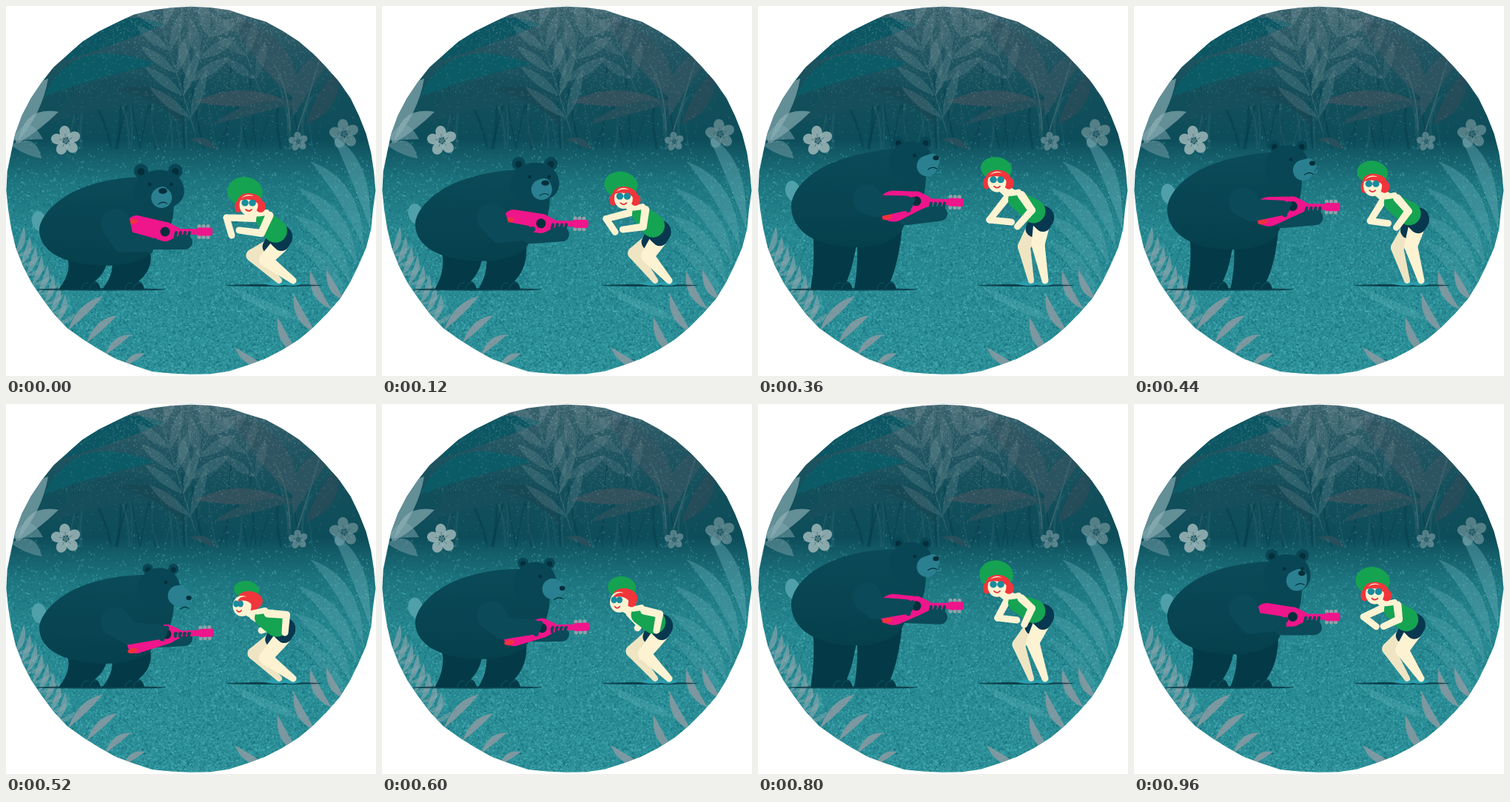
Write an HTML page with a canvas that moves like this. It is 500 px wide and 500 px high and loops after 1000 ms.

```html
<!DOCTYPE html>
<html lang="en">
<head>
<meta charset="utf-8">
<title>Jungle jam</title>
<style>
html, body { margin: 0; width: 100%; height: 100%; overflow: hidden; background: #fff; }
canvas { display: block; width: 100vmin; height: 100vmin; }
</style>
</head>
<body>
<canvas id="stage" width="500" height="500"></canvas>
<script>
const stage = document.getElementById('stage');
const backdrop = document.createElement('canvas');
backdrop.width = backdrop.height = 500;
let g = backdrop.getContext('2d');
const TAU = Math.PI * 2;

let seed = 7;
function rnd() {
  seed = (seed * 16807) % 2147483647;
  return seed / 2147483647;
}

// ---- drawing helpers ----
function oval([x, y], rx, ry, color, rot = 0) {
  g.fillStyle = color;
  g.beginPath();
  g.ellipse(x, y, rx, ry, rot, 0, TAU);
  g.fill();
}

// Rounded limb that tapers from r1 to r2
function limb(p, r1, q, r2, color) {
  const dx = q[0] - p[0], dy = q[1] - p[1], d = Math.hypot(dx, dy);
  if (d <= Math.abs(r1 - r2)) {
    const r = Math.max(r1, r2);
    return oval(r1 > r2 ? p : q, r, r, color);
  }
  const a = Math.atan2(dy, dx), b = Math.acos((r1 - r2) / d);
  g.fillStyle = color;
  g.beginPath();
  g.arc(...p, r1, a + b, a - b + TAU);
  g.arc(...q, r2, a - b, a + b);
  g.fill();
}

function joint(a, ra, b, rb, c, rc, color) {
  limb(a, ra, b, rb, color);
  limb(b, rb, c, rc, color);
}

function line(x1, y1, cx, cy, x2, y2, w, color) {
  g.strokeStyle = color;
  g.lineWidth = w;
  g.lineCap = 'round';
  g.beginPath();
  g.moveTo(x1, y1);
  g.quadraticCurveTo(cx, cy, x2, y2);
  g.stroke();
}

// Curved leaf from base to tip, w wide
function blade(x1, y1, cx, cy, x2, y2, w, color) {
  const d = Math.hypot(x2 - x1, y2 - y1), nx = (y1 - y2) / d * w, ny = (x2 - x1) / d * w;
  g.fillStyle = color;
  g.beginPath();
  g.moveTo(x1, y1);
  g.quadraticCurveTo(cx + nx, cy + ny, x2, y2);
  g.quadraticCurveTo(cx - nx, cy - ny, x1, y1);
  g.fill();
}

function frond(x1, y1, x2, y2, count, len, w, color) {
  const a = Math.atan2(y2 - y1, x2 - x1);
  line(x1, y1, (x1 + x2) / 2, (y1 + y2) / 2, x2, y2, 1.5, color);
  for (let i = 0; i < count; i++) {
    const u = (i + .6) / count, x = x1 + (x2 - x1) * u, y = y1 + (y2 - y1) * u;
    const l = len * (1 - u * .3);
    for (const b of [a - .62, a + .62]) {
      const ex = Math.cos(b) * l, ey = Math.sin(b) * l;
      blade(x, y, x + ex * .55, y + ey * .55, x + ex, y + ey, w, color);
    }
  }
}

function flower(x, y, r, color, core) {
  for (let i = 0; i < 5; i++) {
    const a = i * TAU / 5 - 1.7, dx = Math.cos(a) * r, dy = Math.sin(a) * r;
    oval([x + dx * .6, y + dy * .6], r * .42, r * .36, color, a);
    line(x, y, x, y, x + dx * .45, y + dy * .45, 1, core);
  }
  oval([x, y], r * .15, r * .15, core);
}

// ---- still scenery ----
function rim() {
  g.beginPath();
  for (let i = 0; i < 60; i++) {
    const a = i * TAU / 60, r = 250 - rnd() * 2.4;
    g.lineTo(249.5 + Math.cos(a) * r, 249.5 + Math.sin(a) * r);
  }
  g.closePath();
}

function jungle() {
  for (let i = 0; i < 34; i++) {
    const x = 90 + rnd() * 330, y = 70 + rnd() * 60;
    line(x + (rnd() - .5) * 24, 192, x, 150, x + (rnd() - .5) * 50, y, 1 + rnd() * 2.5,
      i % 2 ? 'rgba(60,112,122,.25)' : 'rgba(5,56,70,.4)');
  }
  // broad leaves, left then right
  blade(78, 74, 140, 22, 214, 25, 32, '#0c5663');
  blade(52, 122, 100, 68, 202, 78, 34, '#0b5b67');
  blade(60, 158, 130, 92, 250, 130, 38, '#164e5b');
  blade(150, 112, 222, 112, 240, 163, 19, '#174955');
  blade(395, 130, 368, 60, 302, 14, 38, '#2e5561');
  blade(254, 130, 320, 118, 392, 134, 22, '#31515d');
  blade(280, 160, 332, 134, 400, 128, 14, '#24505c');
  blade(388, 150, 398, 80, 452, 58, 27, '#2c5360');
  blade(405, 160, 438, 128, 448, 84, 23, '#254c59');
  blade(248, 180, 270, 180, 286, 195, 9, '#28505c');
  line(384, 168, 382, 110, 362, 78, 2, '#3b626b');
  line(394, 168, 410, 120, 426, 66, 2, '#36616b');

  frond(255, 170, 208, 18, 5, 72, 13, 'rgba(142,165,171,.2)');
  frond(240, 120, 292, 0, 4, 66, 15, 'rgba(145,160,168,.18)');
  frond(345, 118, 296, -8, 4, 56, 12, 'rgba(140,158,166,.14)');
}

function grain() {
  for (let i = 0; i < 24000; i++) {
    const y = 170 + Math.sqrt(rnd()) * 330, s = .8 + rnd() * 1.6;
    g.fillStyle = rnd() < .56 ? 'rgba(95,195,200,.3)' : 'rgba(10,95,110,.3)';
    g.fillRect(rnd() * 500, y, s, s);
  }
  // pale mist of specks at the top
  for (let i = 0; i < 4500; i++) {
    const x = 270 + (rnd() + rnd() - 1) * 230, y = rnd() * rnd() * 190;
    g.fillStyle = 'rgba(160,180,187,.18)';
    g.fillRect(x, y, 1.5, 1.5);
  }
}

function foreground() {
  const white = 'rgba(150,182,188,.62)', fern = 'rgba(138,155,163,.85)';
  blade(14, 186, 22, 132, 57, 98, 30, white);
  blade(16, 186, 36, 150, 71, 143, 20, white);
  blade(8, 182, 30, 160, 50, 180, 20, 'rgba(130,170,178,.5)');
  blade(6, 188, 34, 186, 48, 206, 18, 'rgba(120,160,168,.5)');
  flower(81, 182, 20, 'rgba(168,190,192,.8)', '#527a81');
  flower(395, 183, 13, 'rgba(140,168,174,.55)', '#356871');
  flower(457, 173, 20, 'rgba(140,168,174,.55)', '#386a74');

  // palm sweeping in from the right
  for (let i = 0; i < 5; i++) {
    const x = 440 - 34 * i + 5.5 * i * i, y = 174 + 36 * i, bx = 492 - 9 * i, by = 300 + 25 * i;
    blade(bx, by, x + (bx - x) * .75, y + (by - y) * .3, x, y, 19, `rgba(105,172,181,${.42 - .05 * i})`);
  }
  blade(405, 425, 352, 410, 300, 378, 12, 'rgba(120,195,198,.2)');

  // ferns along the lower rim
  for (let i = 0; i < 8; i++) {
    const x = 24 + 8 * i, y = 298 + 13 * i;
    blade(x - 13, y + 40, x + 1, y + 22, x, y, 8, 'rgba(135,165,172,.65)');
    blade(x - 13, y + 40, x + 6, y + 38, x + 14, y + 26, 6, 'rgba(135,165,172,.5)');
  }
  for (let i = 0; i < 4; i++) {
    const x = 131 + 19 * i, y = 392 + 26 * i, bx = 84 + 25 * i, by = 438 + 17 * i;
    blade(bx, by, (x + bx) / 2 - 3, (y + by) / 2 - 7, x, y, 11 - i, fern);
  }
  for (let i = 0; i < 3; i++) {
    const x = 411 - 22 * i, y = 358 + 31 * i;
    blade(x + 29, y + 52, x + 5, y + 33, x, y, 11, fern);
  }
  blade(456, 396, 440, 386, 433, 356, 10, fern);
  blade(352, 487, 326, 482, 309, 461, 10, fern);
}

function scenery() {
  g.fillStyle = '#fff';
  g.fillRect(0, 0, 500, 500);
  rim();
  g.clip();
  const sky = g.createLinearGradient(0, 0, 0, 500);
  [[0, '#37606b'], [.12, '#215561'], [.24, '#124f5b'], [.36, '#0d4d5a'], [.41, '#155f6b'],
    [.48, '#1d7680'], [.6, '#26868f'], [.8, '#298c95'], [1, '#2d9199']]
    .forEach(([at, c]) => sky.addColorStop(at, c));
  g.fillStyle = sky;
  g.fillRect(0, 0, 500, 500);
  jungle();
  grain();
  foreground();
  oval([128, 383], 88, 1.7, 'rgba(6,48,60,.75)');
  oval([362, 377.5], 65, 1.5, 'rgba(6,48,60,.8)');
}

// ---- motion: two dips per loop, each to its own side ----
let dip, side, sway;

function pose(step) {
  const beat = (1 + Math.cos((step - .75) * TAU / 12)) / 2;
  dip = Math.min(1, 1.17 * beat ** 4);
  side = dip * Math.cos(step * TAU / 24);
  sway = Math.sin(step * TAU / 24);
}

const mixed = (v, d, e = 0, s = 0) => v + d * dip + e * side + s * sway;
const at = (x, y, dx, dy, ex, ey, sx, sy) => [mixed(x, dx, ex, sx), mixed(y, dy, ey, sy)];
const add = ([x, y], dx, dy) => [x + dx, y + dy];
const mix = (a, b, u) => [a[0] + (b[0] - a[0]) * u, a[1] + (b[1] - a[1]) * u];

// ---- bear ----
const FUR = '#094655', ARM = '#0b4a58', LEG = '#043a47', INK = '#042f3b', PINK = '#ef158b';

function bearLegs(d) {
  const bend = d * .42, y = 345 + d * .32;
  g.fillStyle = LEG;
  for (const x of [72, 131]) {
    g.beginPath();
    g.moveTo(x + 2 + bend * .4, 300 + d);
    g.quadraticCurveTo(x + 7 + bend, y, x - 1, 383);
    g.lineTo(x + 56, 383);
    g.quadraticCurveTo(x + 54, 373, x + 48, 372);
    g.quadraticCurveTo(x + 60 + bend * .6, y, x + 64, 300 + d);
    g.fill();
    for (const toe of [30, 41]) line(x + toe, 382, x + toe + 2, 373, x + toe + 9, 374, 1, '#0f5563');
  }
}

function bearBody(d, [hx, hy]) {
  const low = d * .7, coat = g.createLinearGradient(0, 200 + d, 0, 330 + d);
  coat.addColorStop(0, '#0b4a58');
  coat.addColorStop(1, '#053f4c');
  g.fillStyle = coat;
  g.beginPath();
  g.moveTo(hx - 20, hy - 16);
  g.bezierCurveTo(150, 198 + d, 112, 206 + d, 84, 222 + d);
  g.bezierCurveTo(58, 237 + d, 44, 258 + d, 45, 275 + d * .9);
  g.bezierCurveTo(47, 305 + d * .8, 75, 322 + low, 110, 326 + low);
  g.bezierCurveTo(150, 332 + low, 192, 322 + low, 198, 296 + d);
  g.bezierCurveTo(207, 285 + d, 227, 278 + d, 227, hy + 18);
  g.fill();
}

function bearHead(head) {
  const s = mixed(.78, -.28, -.45), [hx, hy] = head, w = 36 - 6 * s, r = 10 - 3 * s;
  const muzzle = add(head, 25 * s + 1, mixed(7, 4));
  const nose = add(muzzle, 14 * s + 1, mixed(-10, 8, -6));
  for (const x of [-26 + 10 * s, 21 - 3 * s]) {
    const ear = add(head, x, -24);
    oval(ear, r, r, FUR);
    oval(add(ear, 0, 1), r * .5, r * .5, INK);
  }
  g.fillStyle = FUR;
  g.beginPath();
  g.moveTo(hx - w, hy + 4);
  g.bezierCurveTo(hx - w + 2, hy - 34, hx + w - 5, hy - 36, hx + w - 3, hy + 2);
  g.bezierCurveTo(hx + w - 1, hy + 36, hx - w, hy + 36, hx - w, hy + 4);
  g.fill();
  limb(add(muzzle, 0, 1), 14, mix(muzzle, nose, .6), 9 + s, '#2a8090');
  oval(nose, 6 - 2.5 * s, 4 - s, INK);
  const [nx, ny] = add(nose, -6 * s, 16 - 3 * s);
  line(nx - 6, ny + 2, nx, ny - 3, nx + 6, ny + 1, 1.1, INK);
  oval(add(head, -15 + 24 * s, -6), 2.4, 2.4, INK);
  if (s < .6) oval(add(head, 15 + 10 * s, -6), 2.4, 2.4, INK);
}

function guitar(hole, end) {
  const size = mixed(21, -9), bout = at(183, 274, -7, 36, 0, -15, 0, -4);
  limb(bout, size, hole, 13, PINK);
  oval(add(bout, -size * .4, size * mixed(.7, -.5, -.5)), 7, 3.5, '#f3313f', -.2);
  g.save();
  g.translate(...hole);
  g.rotate(Math.atan2(end[1] - hole[1], end[0] - hole[0]));
  limb([0, 0], 13, [14, 0], 7, PINK);
  for (const x of [46, 52, 58]) {
    for (const y of [-7, 7]) oval([x, y], 2.6, 3, '#8fa3a8');
  }
  g.fillStyle = PINK;
  g.fillRect(8, -4, 38, 8);
  g.beginPath();
  g.roundRect(43, -5.5, 21, 11, 3);
  g.fill();
  oval([0, 0], 6.5, 6.5, INK);
  g.restore();
}

function bear() {
  const drop = mixed(-2, 35), head = at(208, 210, 0, 37, 0, 0, 0, -2);
  const hole = at(214, 268, 2, 40, -1, -3, 0, -5), end = at(278, 269, 0, 38, 0, -2, 0, -4);
  const grip = at(246, 284, -4, 34, 0, 1, 0, -4);
  const elbow = at(159, 273, 3, 41, -4, 4, 0, -3), hand = at(200, 270, 0, 45, -8, 7, 0, -4);
  oval(at(47, 250, -2, 37, 0, 4), 10, 14, '#4fa0a9', -.2);
  bearLegs(drop);
  bearBody(drop, head);
  bearHead(head);
  limb([200, 287 + drop * .95], 11, grip, 10, ARM);
  guitar(hole, end);
  for (let i = 0; i < 4; i++) {
    const [x, y] = add(grip, i * 6 - 13, -3);
    line(x, y, x - 1, y - 5, x + 1, end[1] + 1, 4, ARM);
  }
  joint([148, 263 + drop * .95], 20, elbow, 15, hand, 10, ARM);
  for (let i = 0; i < 3; i++) limb(hand, 6, add(hand, 9 - i * 3, i * 7 - 5), 3.5, ARM);
}

// ---- girl ----
const SKIN = '#fdf3d2', SHADE = '#efe5c3', GREEN = '#15a452', RED = '#f0353b', NAVY = '#07384f', LENS = '#198c9e';

function girlHead(face) {
  const t = Math.max(0, -side), [fx, fy] = face;
  oval(at(322, 225, 2, 26, -1, 0, 0, -6), mixed(22, -1.5, 3.5, -1), mixed(17.5, -1.5, 4, -2), '#15a352', .12);
  oval([fx + 2 + 8 * t, fy - 2 - 4 * t], 17, 12, RED, .15);
  oval([fx - 14 + 26 * t, fy + 4 - 4 * t], 5, 8, RED);
  oval([fx + 16, fy + 4 - 5 * t], 7, 8, RED);
  oval([fx - t, fy + 2], 12.5, 14, SKIN);
  g.fillStyle = RED;
  g.beginPath();
  g.moveTo(fx - 13 + 6 * t, fy - 4);
  g.quadraticCurveTo(fx - 4, fy - 15, fx + 14, fy - 8);
  g.lineTo(fx + 14, fy + 2);
  g.quadraticCurveTo(fx + 6, fy - 9, fx - 13 + 6 * t, fy - 4);
  g.fill();
  for (const x of [-5 - 4 * t, 5 - 8 * t]) oval([fx + x, fy - 1], 4.8 - t, 4.6, LENS);
  line(fx - 4 - 4 * t, fy + 8, fx - 5 * t, fy + 12, fx + 4 - 6 * t, fy + 8, 1.8, '#e5303a');
}

function girl() {
  const face = at(323, 240, 1, 29, 4, -2, 0, -5);
  const shoulder = at(350, 264, -1, 24, 1, 0, 0, -4), hip = at(384, 286, -11, 22, -2, 4);
  const knee1 = at(356, 325, -22, 12, -1, 0, 4), knee2 = at(375, 322, -24, 21, 0, 0, 4);
  const elbow1 = at(318, 289, 10, 5, -30, -8, -6), hand1 = at(346, 292, -21, 16, -20, 2, -4);
  const elbow2 = at(370, 276, -8, 20, -17, 11), hand2 = at(355, 298, -9, 8, -31, -3, -5);
  const thigh1 = add(hip, -9, 11), thigh2 = add(hip, -1, 11);

  oval([366, 375], 15, 3, '#2b9dab');
  oval([386, 375], 13, 3, '#2b9dab');
  joint(thigh1, 11, knee1, 8.5, [369, 371], 4, SHADE);
  limb(hip, 16, mix(thigh1, knee1, .15), 11, NAVY);
  joint(thigh2, 11, knee2, 9, [388, 371], 4.5, SKIN);
  limb(hip, 16, add(thigh2, 2, -3), 11, NAVY);
  joint(add(shoulder, -14, -1), 5, elbow1, 4.5, hand1, 4.5, SKIN);
  limb(add(face, 4, 8), 6, shoulder, 9, SKIN);
  limb(add(shoulder, 0, 1), 12, mix(shoulder, hip, .66), 16, GREEN);
  limb(add(shoulder, -9, -7), 3.5, add(shoulder, 2, -9), 4, SKIN);
  girlHead(face);
  joint(add(shoulder, 6, -5), 5.5, elbow2, 5, hand2, 4.5, SKIN);
}

// ---- loop ----
scenery();
g = stage.getContext('2d');
const start = performance.now();

function draw(now) {
  const t = Math.max(0, now - start) % 1000;
  pose(Math.max(0, Math.floor(t / 40) - 1));
  g.drawImage(backdrop, 0, 0);
  bear();
  girl();
  requestAnimationFrame(draw);
}
draw(start);
</script>
</body>
</html>
```
